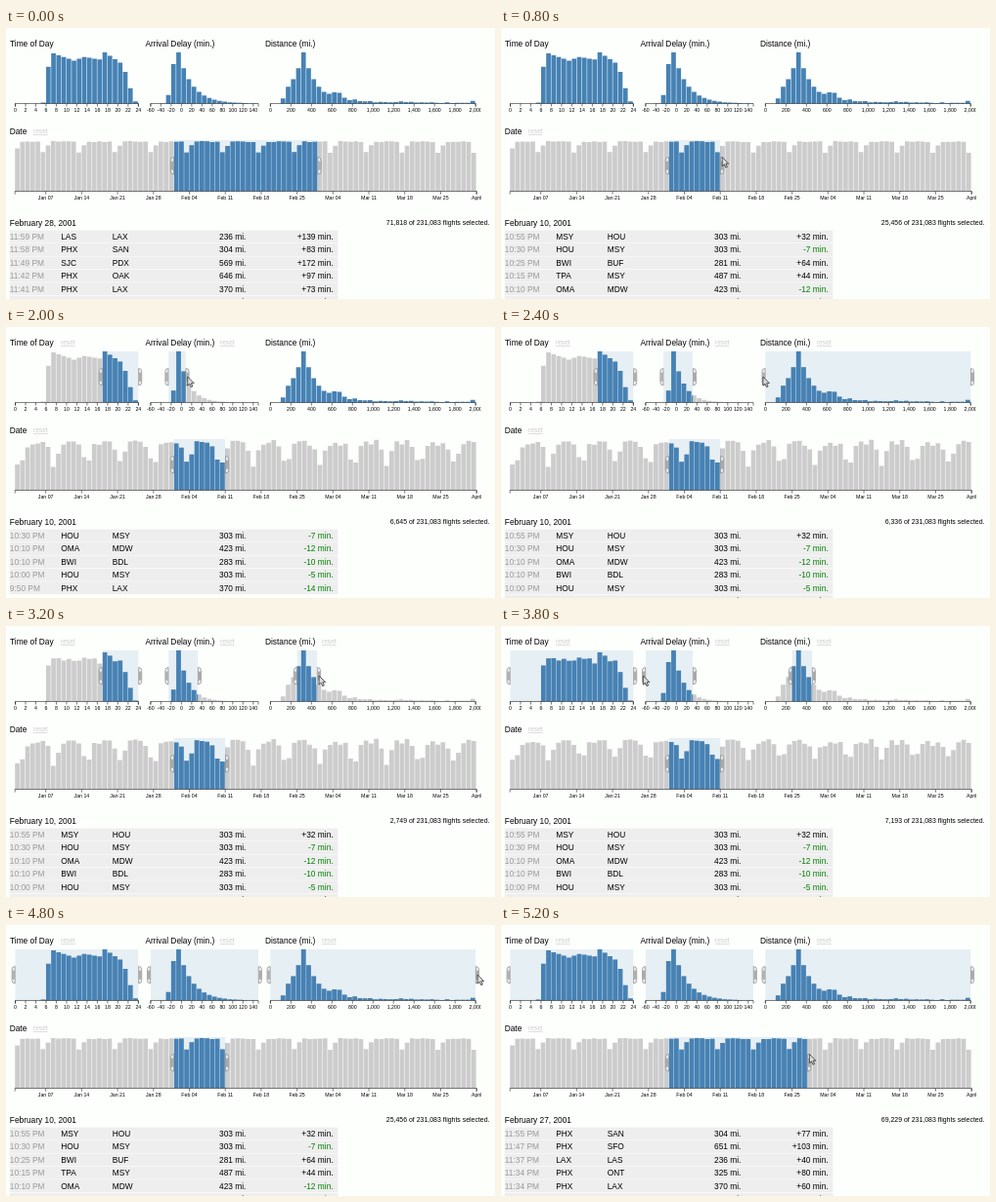
Write an HTML page that moves like this. It is 500 px wide and 278 px high and loops after 5.4 s.

```html
<!DOCTYPE html>
<html lang="en">
<head>
<meta charset="utf-8">
<title>Flight filter</title>
<style>
html, body { margin: 0; width: 100%; height: 100%; overflow: hidden; background: #fdfffd; }
#stage { display: block; width: 500px; height: 278px; font: 8.35px "Liberation Sans", Arial, sans-serif; }
.reset { font-size: 6.6px; fill: #ccc; text-decoration: underline; }
.total { font-size: 6.95px; text-anchor: end; }
.axis { font-size: 10px; text-anchor: middle; }
.axis path { fill: none; stroke: #000; }
.handle { fill: #eee; stroke: #666; }
.right { text-anchor: end; }
</style>
</head>
<body>
<svg id="stage" viewBox="0 0 500 278"></svg>
<script>
const stage = document.getElementById('stage');
const STEP = 200, STEPS = 27, SCALE = 0.5244;

const range = (n, f) => Array.from({ length: n }, (_, i) => f(i));
const noise = i => { const v = Math.sin(i * 12.9898 + 4.1) * 43758.5453; return v - Math.floor(v); };
const mix = (a, b, t) => a + (b - a) * Math.min(1, Math.max(0, t));
const text = (x, y, str, attrs = '') => `<text x="${x}" y="${y}" ${attrs}>${str}</text>`;
const commas = n => n.toLocaleString('en-US');

// Piecewise linear curve through [position, value] points
function track(at, ...keys) {
  let value = keys[0][1];
  for (let i = 1; i < keys.length; i++) {
    const [a] = keys[i - 1], [b, to] = keys[i];
    if (at > a) value = mix(keys[i - 1][1], to, (at - a) / (b - a));
  }
  return value;
}

const charts = {
  hour: { title: 'Time of Day', x: 9.5, y: 25, n: 24, resetX: 56, ticks: range(13, i => [i * 2, i * 2]) },
  delay: { title: 'Arrival Delay (min.)', x: 147.9, y: 25, n: 21, resetX: 219,
    ticks: range(11, i => [i * 2, i * 20 - 60]) },
  dist: { title: 'Distance (mi.)', x: 270.4, y: 25, n: 40, resetX: 323,
    ticks: range(11, i => [i * 4, commas(i * 200)]) },
  date: { title: 'Date', x: 9.2, y: 115, n: 90, resetX: 28, first: 31,
    ticks: range(13, i => {
      const day = new Date(2001, 0, 7 + i * 7);
      const month = day.toLocaleString('en-US', { month: i < 12 ? 'short' : 'long' });
      return [6 + i * 7, i < 12 ? month + ' ' + String(day.getDate()).padStart(2, '0') : month];
    }) }
};

// chart, brush end (0 low, 1 high), from and to in bars, start and stop in steps
const drags = [
  ['date', 1, 59, 41, 0, 3],
  ['hour', 0, 24, 17, 4.5, 7],
  ['delay', 0, 3.5, 3.5, 8.5, 8.6],
  ['delay', 1, 3.5, 9.2, 8.6, 11],
  ['dist', 0, 40, 0, 11.2, 12],
  ['dist', 0, 0, 5.2, 12, 14],
  ['dist', 1, 40, 9.1, 14, 16],
  ['hour', 0, 17, 0, 16.5, 18],
  ['delay', 0, 3.5, 0, 18.5, 19],
  ['delay', 1, 9.2, 21, 19.5, 21],
  ['dist', 0, 5.2, 0, 22, 23],
  ['dist', 1, 9.1, 40, 23, 24],
  ['date', 1, 41, 58, 24, 26]
];

const dragged = ([, , from, to, start, stop], k) => mix(from, to, (k - start) / (stop - start));

function brushOf(id, k) {
  const mine = drags.filter(d => d[0] === id);
  if (k < mine[0][4]) return null;
  return [0, 1].map(end => {
    const moves = mine.filter(d => d[1] === end);
    if (!moves.length) return end ? charts[id].n : charts[id].first || 0;
    return dragged(moves.filter(d => d[4] <= k).pop() || moves[0], k);
  });
}

// 0 for no filter, 1 for a narrow one
const strength = (brush, n) => brush ? Math.min(1, (1 - (brush[1] - brush[0]) / n) * 1.4) : 0;

// Bar heights in percent of the chart
const shapes = {
  hour: (i, s) => i < 5 ? 0 : track(i, [5, 2], [6, 72], [7, 98], [11, 84], [13, 91], [16, 86], [17, 100],
    [20, 80], [21, 62], [22, 30], [23, 4]) - 14 * s.dist * noise(i),
  delay: (i, s) => i < 5
    ? 100 * Math.exp(-(.26 + 1.2 * s.hour) * (5 - i) ** 2.8)
    : 100 * Math.exp(-(.37 + .13 * Math.max(s.hour, s.dist)) * (i - 5)),
  dist: i => i < 2 ? 0 : 100 * Math.exp(-.37 * Math.abs(i - 6)) - (i === 2 ? 13 : 0) +
    12 * Math.exp(-(((i - 12.4) / 1.2) ** 2)) +
    (i > 12 ? (3 + 7 * noise(i)) * (1 - i / 45) : 0) + (i === 39 ? 4 : 0),
  date: (i, s) => {
    const week = i % 7;
    const usual = week === 5 ? mix(77, 54, s.hour) : week === 6 ? mix(90, 92, s.hour)
      : mix(98, 89 + 2 * week, s.hour);
    const storm = (.5 + .5 * Math.cos((i - 39.6) * Math.PI * 2 / 6.5)) ** 4;
    const punctual = 99 - 42 * storm - 12 * noise(i);
    return mix(usual - 2 * noise(i + 200), punctual, s.delay) - (i === 0 ? 14 : 0);
  }
};

// hour, minute, origin, destination, miles, delay
const flights = {
  28: ['11:59,LAS,LAX,236,139', '11:58,PHX,SAN,304,83', '11:49,SJC,PDX,569,172', '11:42,PHX,OAK,646,97',
    '11:41,PHX,LAX,370,73', '11:38,PHX,ONT,325,86'],
  27: ['11:55,PHX,SAN,304,77', '11:47,PHX,SFO,651,103', '11:37,LAX,LAS,236,40', '11:34,PHX,ONT,325,80',
    '11:34,PHX,LAX,370,60', '11:34,SLC,BOI,291,67'],
  10: ['10:55,MSY,HOU,303,32', '10:30,HOU,MSY,303,-7', '10:25,BWI,BUF,281,64', '10:15,TPA,MSY,487,44',
    '10:10,OMA,MDW,423,-12', '10:10,BWI,BDL,283,-10', '10:00,HOU,MSY,303,-5', '10:00,MSY,MCO,550,17',
    '9:55,MSY,HOU,303,10', '9:50,PHX,LAX,370,-14']
};

function handle(x, east) {
  const d = east ? 1 : -1, y = 100 / 3;
  return `<path class="handle" transform="translate(${x})" d="M${.5 * d},${y}
    A6,6 0 0 ${+east} ${6.5 * d},${y + 6}V${2 * y - 6}A6,6 0 0 ${+east} ${.5 * d},${2 * y}Z
    M${2.5 * d},${y + 8}V${2 * y - 8}M${4.5 * d},${y + 8}V${2 * y - 8}"/>`;
}

function chart(id, brush, strengths) {
  const { title, x, y, n, resetX, ticks } = charts[id];
  const w = n * 10;
  const path = range(n, i => {
    const h = shapes[id](i, strengths);
    return h > 0 ? `M${i * 10},100V${100 - h}h9V100` : '';
  }).join('');
  const axis = `<g class="axis"><path d="M0,106V100H${w}V106${ticks.map(([p]) => `M${p * 10},100v6`).join('')}"/>
    ${ticks.map(([p, s]) => text(p * 10, 116.1, s)).join('')}</g>`;
  let plot = `<path fill="#4682b4" d="${path}"/>`;
  let reset = '', grips = '';
  if (brush) {
    const [lo, hi] = brush.map(v => v * 10);
    plot = `<clipPath id="${id}"><rect x="${lo}" width="${hi - lo}" height="100"/></clipPath>
      <path fill="#ccc" d="${path}"/><g clip-path="url(#${id})">${plot}</g>
      <rect x="${lo}" width="${hi - lo}" height="100" fill="#4682b4" fill-opacity=".125"/>`;
    grips = handle(lo, false) + handle(hi, true);
    reset = text(resetX, y - 6.8, 'reset', 'class="reset"');
  }
  return text(x - 5.5, y - 6.5, title) + reset +
    `<svg x="${x - 10 * SCALE}" y="${y - 10 * SCALE}" width="${(w + 20) * SCALE}" height="${130 * SCALE}"
      viewBox="-10 -10 ${w + 20} 130">${plot}${axis}${grips}</svg>`;
}

function list(day, delay, dist) {
  const inside = (v, brush) => !brush || v >= brush[0] && v <= brush[1];
  const rows = (flights[day] || flights[27 + day % 2]).map(r => r.split(','))
    .filter(r => inside((+r[4] + 60) / 10, delay) && inside(r[3] / 50, dist)).slice(0, 6);
  return text(3.8, 203, `February ${day}, 2001`) + rows.map(([time, from, to, far, late], i) => {
    const y = 216.9 + 13.4 * i;
    return `<rect x="3.8" y="${y - 9.3}" width="335.6" height="12.9" fill="#eee"/>` +
      text(3.8, y, time + ' PM', 'fill="#999"') + text(56.2, y, from) + text(108.7, y, to) +
      text(245.4, y, far + ' mi.', 'class="right"') +
      text(334.6, y, (late > 0 ? '+' : '') + late + ' min.', `class="right" fill="${late < 0 ? 'green' : '#000'}"`);
  }).join('');
}

// The pointer holds the brush end of the latest drag
function cursor(k) {
  const drag = drags.filter(d => d[4] < k).pop();
  if (!drag) return '';
  const [id, end] = drag, { x, y } = charts[id];
  const left = x + dragged(drag, k) * 10 * SCALE + (end ? 2 : -2.5);
  return `<path transform="translate(${left},${y + (id === 'date' ? 17.5 : 26)})"
    d="M0,0V9.2L2.1,7.3L3.6,10.7L5.2,10L3.7,6.7H6.5Z" fill="#ddd" stroke="#333" stroke-width=".8"/>`;
}

function draw(k) {
  const brushes = {}, strengths = {};
  for (const id in charts) {
    brushes[id] = brushOf(id, k);
    strengths[id] = strength(brushes[id], charts[id].n);
  }
  brushes.date = brushes.date.map(Math.round);
  const total = Math.round(track(k, [0, 71818], [3, 25456], [4, 25456], [7, 7264], [8, 7264], [11, 6336],
    [12, 6336], [16, 2749], [21, 10156], [22, 10156], [24, 25456], [26, 69229]));
  stage.innerHTML = Object.keys(charts).map(id => chart(id, brushes[id], strengths)).join('') +
    text(494.5, 201.5, `${commas(total)} of 231,083 flights selected.`, 'class="total"') +
    list(brushes.date[1] - 31, brushes.delay, brushes.dist) + cursor(k);
}

const start = performance.now();
let shown = -1;
function tick() {
  const k = Math.floor((performance.now() - start) / STEP) % STEPS;
  if (k !== shown) draw(shown = k);
  requestAnimationFrame(tick);
}
tick();
</script>
</body>
</html>
```
